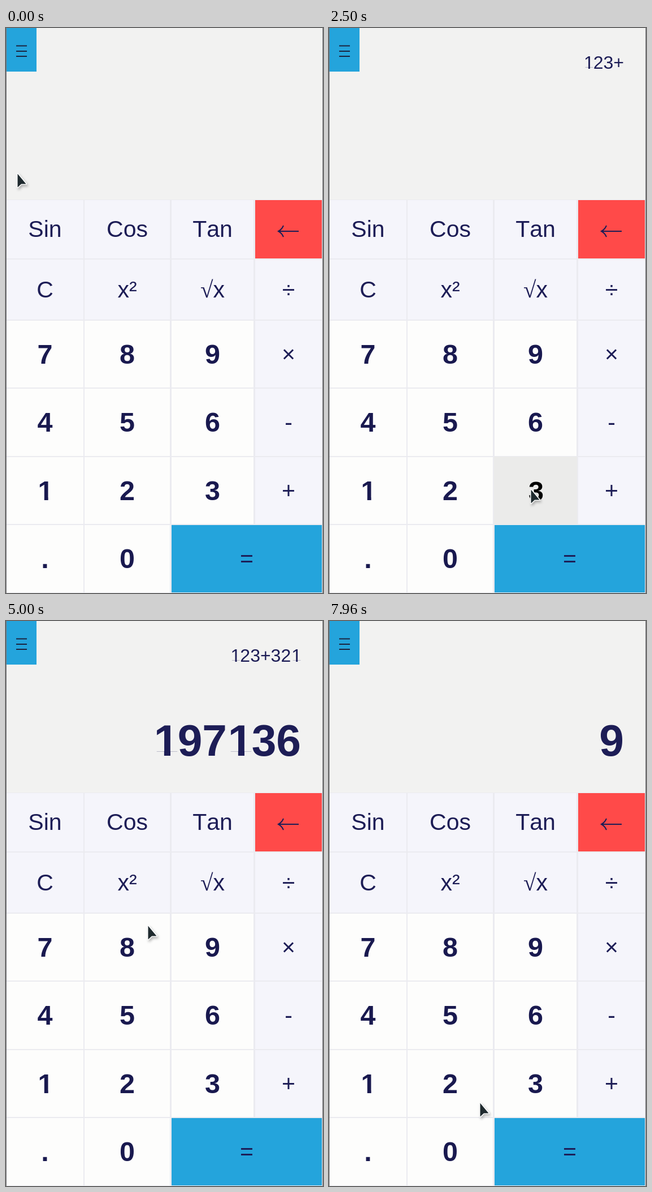
These frames come from a looping animation (561 by 998 pixels, 8 s). An HTML page:

```html
<!DOCTYPE html>
<html lang="en">
<head>
<meta charset="utf-8">
<title>Calculator</title>
<style>
  html, body { margin: 0; width: 100%; height: 100%; overflow: hidden; }
  #stage {
    position: relative; width: 561px; height: 998px; overflow: hidden;
    background: #f2f2f1; color: #1d1d56;
    font-family: "Liberation Sans", Arial, sans-serif; font-kerning: none;
  }
  #stage > * { position: absolute; }
  #keys { left: 0; top: 303px; width: 561px; height: 695px; background: #ebebf0; }
  .key {
    display: flex; align-items: center; justify-content: center;
    box-sizing: border-box; background: #f5f5fb; font-size: 41px; line-height: 1;
  }
  .digit { background: #fdfdfc; font-size: 48.5px; font-weight: bold; color: #19194f; }
  .red { background: #ff4a49; }
  .blue, #menu { background: #24a4dc; }
  .key.down {
    background: #ebebea; box-shadow: 0 0 0 1px #ebebea; color: #000;
    padding: 2px 0 0 2px; z-index: 1;
  }
  .root { font-family: "Liberation Serif", serif; }
  #menu { left: 1px; top: 0; width: 53px; height: 77px; }
  .icon { fill: none; stroke: currentColor; stroke-width: 2; }
  .readout { right: 39px; line-height: 1; white-space: pre; }
  #sum { top: 45px; font-size: 32px; }
  #value { top: 172px; font-size: 78.5px; font-weight: bold; }
  .edge { top: 0; width: 1px; height: 998px; background: #77777b; z-index: 2; }

  /* A figure one without its foot */
  .one {
    --l: .248em; --r: .343em; --h: .771em;
    display: inline-block; font-style: normal; line-height: 1; transform: translateX(.033em);
    clip-path: polygon(0 0, 100% 0, 100% var(--h), var(--r) var(--h),
      var(--r) 100%, var(--l) 100%, var(--l) var(--h), 0 var(--h));
  }
  .digit .one, #value .one { --l: .231em; --r: .373em; --h: .743em; transform: translateX(.022em); }

  #cursor { left: 0; top: 0; z-index: 3; overflow: visible; filter: drop-shadow(2px 3px 2px #0004); }
</style>
</head>
<body>
<div id="stage">
  <div id="keys"></div>
  <div id="menu">
    <svg class="icon" width="53" height="77" color="#1b2440"><path d="M17 31.5h19M17 41h19M17 50h19"/></svg>
  </div>
  <div id="sum" class="readout"></div>
  <div id="value" class="readout"></div>
  <div class="edge" style="left:0"></div>
  <div class="edge" style="left:560px"></div>
  <svg id="cursor" width="20" height="32">
    <path d="M.5 .5V24.5L7 18.5H15.5Z" fill="#1f2a2e" stroke="#fff" stroke-width="3" stroke-linejoin="round" paint-order="stroke"/>
  </svg>
</div>
<script>
const LOOP = 8000;
const HOLD = 95;
const $ = id => document.getElementById(id);

const columns = [[1, 137], [139, 290], [293, 438], [441, 559]];
const rows = [[304, 407], [409, 515], [517, 635], [637, 756], [758, 876], [878, 997]];
const labels = [
  ["Sin", "Cos", "Tan", "←"],
  ["C", "x²", "√x", "÷"],
  ["7", "8", "9", "×"],
  ["4", "5", "6", "-"],
  ["1", "2", "3", "+"],
  [".", "0", "="],
];
const arrow = `<svg class="icon" width="40" height="24" style="margin-top:7px">
  <path d="M2 12H38M11 2Q8 9 2 12Q8 15 11 22"/></svg>`;

const figures = text => text.replace(/1/g, '<i class="one">1</i>');

function face(label) {
  if (label === "←") return arrow;
  if (label === "√x") return '<span class="root">√</span>x';
  return figures(label);
}

const keys = {};
labels.forEach((line, r) => line.forEach((label, c) => {
  const key = document.createElement("div");
  const [left, top] = [columns[c][0], rows[r][0]];
  const right = label === "=" ? 559 : columns[c][1];
  key.className = "key";
  if (/[\d.]/.test(label)) key.classList.add("digit");
  if (label === "←") key.classList.add("red");
  if (label === "=") key.classList.add("blue");
  key.style.cssText = `left:${left}px;top:${top}px;width:${right - left}px;height:${rows[r][1] - top}px`;
  key.innerHTML = face(label);
  $("stage").insertBefore(key, $("menu"));
  keys[label] = key;
}));

// Press time, key, then the two readouts after release
const presses = [
  [930, "1", "", "1"],
  [1400, "2", "", "12"],
  [1850, "3", "", "123"],
  [2130, "+", "123+", ""],
  [2440, "3", "123+", "3"],
  [2680, "2", "123+", "32"],
  [2900, "1", "123+", "321"],
  [3270, "=", "123+321", "444"],
  [4250, "x²", "123+321", "197136"],
  [5420, "√x", "123+321", "444.0"],
  [6750, "C", "", ""],
  [7610, "9", "", "9"],
];

// Arrival time, departure time, x, y
const stops = [
  [0, 150, 20, 257],
  [850, 1040, 72, 812],
  [1340, 1640, 219, 811],
  [1830, 1960, 362, 815],
  [2110, 2240, 500, 815],
  [2420, 2550, 357, 815],
  [2660, 2780, 215, 815],
  [2890, 3010, 72, 815],
  [3250, 3480, 455, 921],
  [4150, 4400, 222, 465],
  [5000, 5030, 251, 538],
  [5350, 5550, 365, 465],
  [5880, 5910, 313, 508],
  [6650, 6870, 72, 465],
  [7500, 7720, 375, 585],
  [8040, 8040, 247, 899],
];

function cursorAt(t) {
  const i = stops.findIndex(stop => stop[0] > t);
  const [, leave, x0, y0] = stops[i - 1];
  const [arrive, , x1, y1] = stops[i];
  const p = Math.max(0, (t - leave) / (arrive - leave));
  const ease = p * p * (3 - 2 * p);
  return [x0 + (x1 - x0) * ease, y0 + (y1 - y0) * ease];
}

const shown = {};
function show(id, text) {
  if (shown[id] === text) return;
  shown[id] = text;
  $(id).innerHTML = figures(text);
}

function draw() {
  const t = performance.now() % LOOP;
  const [x, y] = cursorAt(t);
  $("cursor").style.transform = `translate(${Math.round(x)}px, ${Math.round(y)}px)`;

  const done = presses.filter(press => t >= press[0] + HOLD).pop();
  show("sum", done ? done[2] : "");
  show("value", done ? done[3] : "");

  const held = presses.find(press => t >= press[0] && t < press[0] + HOLD);
  for (const label in keys) keys[label].classList.toggle("down", !!held && held[1] === label);
  requestAnimationFrame(draw);
}
draw();
</script>
</body>
</html>
```
